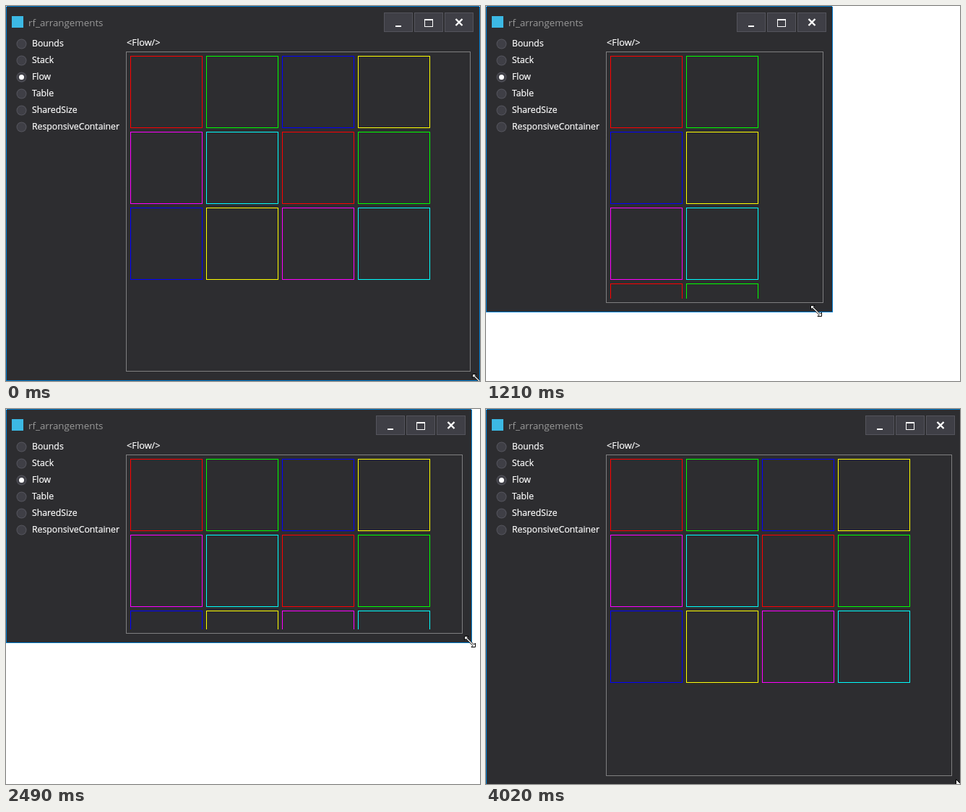
These frames come from a looping animation (656 by 519 pixels, 4.06 s). An HTML page with a canvas:

```html
<!DOCTYPE html>
<html lang="en">
<head>
<meta charset="utf-8">
<title>Flow layout</title>
<style>
  html, body { margin: 0; width: 100%; height: 100%; overflow: hidden; background: #fff; }
  canvas { position: absolute; left: 0; top: 0; }
  .label {
    position: absolute; height: 20px; line-height: 20px; white-space: pre;
    font-family: "Open Sans", "Noto Sans", sans-serif; font-size: 12.25px; color: #fff;
    -webkit-text-stroke: 0.2px;
  }
  .title { left: 31px; top: 13px; font-size: 13.33px; color: #999; -webkit-text-stroke: 0; }
  .heading { left: 167px; top: 40px; font-size: 12.8px; }
  .option { left: 36px; }
</style>
</head>
<body>
<canvas id="stage" width="656" height="519"></canvas>
<div class="label title">rf_arrangements</div>
<div class="label heading">&lt;Flow/&gt;</div>
<script>
const LOOP = 4060, ARROW_TIME = 4020;
const STEP = 42.3, FIRST_STEP = 110;
const MIN_WIDTH = 480;
const BACK = '#2d2d30', FACE = '#3f3f46', EDGE = '#54545c', ACCENT = '#007acc';
const OPTIONS = ['Bounds', 'Stack', 'Flow', 'Table', 'SharedSize', 'ResponsiveContainer'];
const COLORS = ['red', 'lime', 'blue', 'yellow', 'magenta', 'cyan'];
const CELL_COUNT = 12, CELL = 100, PITCH = 105;

// The pointer drags the window corner: start time, end time, destination.
const START = { x: 653, y: 517 };
const DRAGS = [
  [110, 780, 481, 506],
  [870, 1160, 457, 422],
  [1210, 1760, 475, 320],
  [1760, 1802, 481, 321],
  [1802, 2450, 642, 322],
  [2530, 2860, 645, 394],
  [2860, 2902, 655, 429],
  [2902, 3060, 654, 512],
  [3400, 3540, 655, 519]
];

const ctx = document.getElementById('stage').getContext('2d');

OPTIONS.forEach((name, i) => {
  const label = document.createElement('div');
  label.className = 'label option';
  label.style.top = 42 + 23 * i + 'px';
  label.textContent = name;
  document.body.append(label);
});

const easeOut = k => 1 - (1 - k) ** 1.5;

function pointerAt(time) {
  let { x, y } = START;
  for (const [from, to, endX, endY] of DRAGS) {
    const k = easeOut(Math.min(1, Math.max(0, (time - from) / (to - from))));
    x += (endX - x) * k;
    y += (endY - y) * k;
  }
  return { x: Math.round(x), y: Math.round(y) };
}

// The window follows the pointer one step late.
function windowAt(time) {
  const { x, y } = pointerAt(time - STEP);
  return { width: Math.max(MIN_WIDTH, x + 3), height: y + 2 };
}

function fill(color, x, y, w, h) {
  ctx.fillStyle = color;
  ctx.fillRect(x, y, w, h);
}

function box(color, x, y, w, h) {
  ctx.strokeStyle = color;
  ctx.lineWidth = 1;
  ctx.strokeRect(x + 0.5, y + 0.5, w - 1, h - 1);
}

function polygon(x, y, points) {
  ctx.beginPath();
  points.forEach(([dx, dy]) => ctx.lineTo(x + dx, y + dy));
  ctx.closePath();
  ctx.fillStyle = '#fff';
  ctx.strokeStyle = '#000';
  ctx.lineWidth = 1;
  ctx.fill();
  ctx.stroke();
}

function disc(x, y, radius, color) {
  ctx.beginPath();
  ctx.arc(x, y, radius, 0, 2 * Math.PI);
  ctx.fillStyle = color;
  ctx.fill();
}

function drawButtons(width) {
  const left = width - 133;
  for (let i = 0; i < 3; i++) {
    fill(FACE, left + 42 * i, 9, 40, 27);
    box(EDGE, left + 42 * i, 9, 40, 27);
  }
  fill('#fff', left + 16, 27, 8, 2);
  box('#fff', left + 56, 18, 12, 11);
  fill('#fff', left + 56, 18, 12, 2);
  const x = left + 104, y = 22.5, r = 4.5;
  ctx.beginPath();
  ctx.moveTo(x - r, y - r);
  ctx.lineTo(x + r, y + r);
  ctx.moveTo(x + r, y - r);
  ctx.lineTo(x - r, y + r);
  ctx.strokeStyle = '#fff';
  ctx.lineWidth = 2.4;
  ctx.stroke();
}

function drawOptions() {
  OPTIONS.forEach((name, i) => {
    const y = 52.5 + 23 * i;
    disc(21.5, y, 7, EDGE);
    disc(21.5, y, 6, FACE);
    if (name === 'Flow') disc(21.5, y, 3.5, '#fff');
  });
}

function drawFlow(width, height) {
  const right = width - 13, bottom = height - 13;
  ctx.setLineDash([1, 1]);
  box('#d0d0d0', 166, 63, right - 166, bottom - 63);
  ctx.setLineDash([]);

  ctx.save();
  ctx.beginPath();
  ctx.rect(172, 69, right - 178, bottom - 75);
  ctx.clip();
  const columns = Math.floor((right - 178 + PITCH - CELL) / PITCH);
  for (let i = 0; i < CELL_COUNT; i++) {
    const x = 172 + PITCH * (i % columns);
    const y = 69 + PITCH * Math.floor(i / columns);
    box(COLORS[i % COLORS.length], x, y, CELL, CELL);
  }
  ctx.restore();
}

function drawResizePointer({ x, y }) {
  const half = [[-7.5, -2], [-7.5, -7.5], [-2, -7.5], [-4, -5.5], [5.5, 4]];
  polygon(x, y, [...half, ...half.map(([dx, dy]) => [-dx, -dy])]);
}

function drawArrow(x, y) {
  polygon(x, y, [[0, 0], [0, 16], [4, 12], [7, 18], [9, 17], [6, 11], [11, 11]]);
}

function draw(now) {
  const time = now % LOOP;
  const stepped = FIRST_STEP + Math.floor((time - FIRST_STEP) / STEP) * STEP;
  const { width, height } = windowAt(stepped);
  fill('#fff', 0, 0, 656, 519);
  fill(BACK, 0, 0, width, height);
  box(ACCENT, 0, 0, width, height);
  fill('#fff', 0, 0, 1, 1);
  fill('#fff', width - 1, 0, 1, 1);
  fill('#3cb9e4', 8, 14, 16, 16);
  drawButtons(width);
  drawOptions();
  drawFlow(width, height);
  if (time < ARROW_TIME) drawResizePointer(pointerAt(stepped));
  else drawArrow(650.5, 512.5);
}

const start = performance.now();
function tick() {
  draw(performance.now() - start);
  requestAnimationFrame(tick);
}
tick();
</script>
</body>
</html>
```
